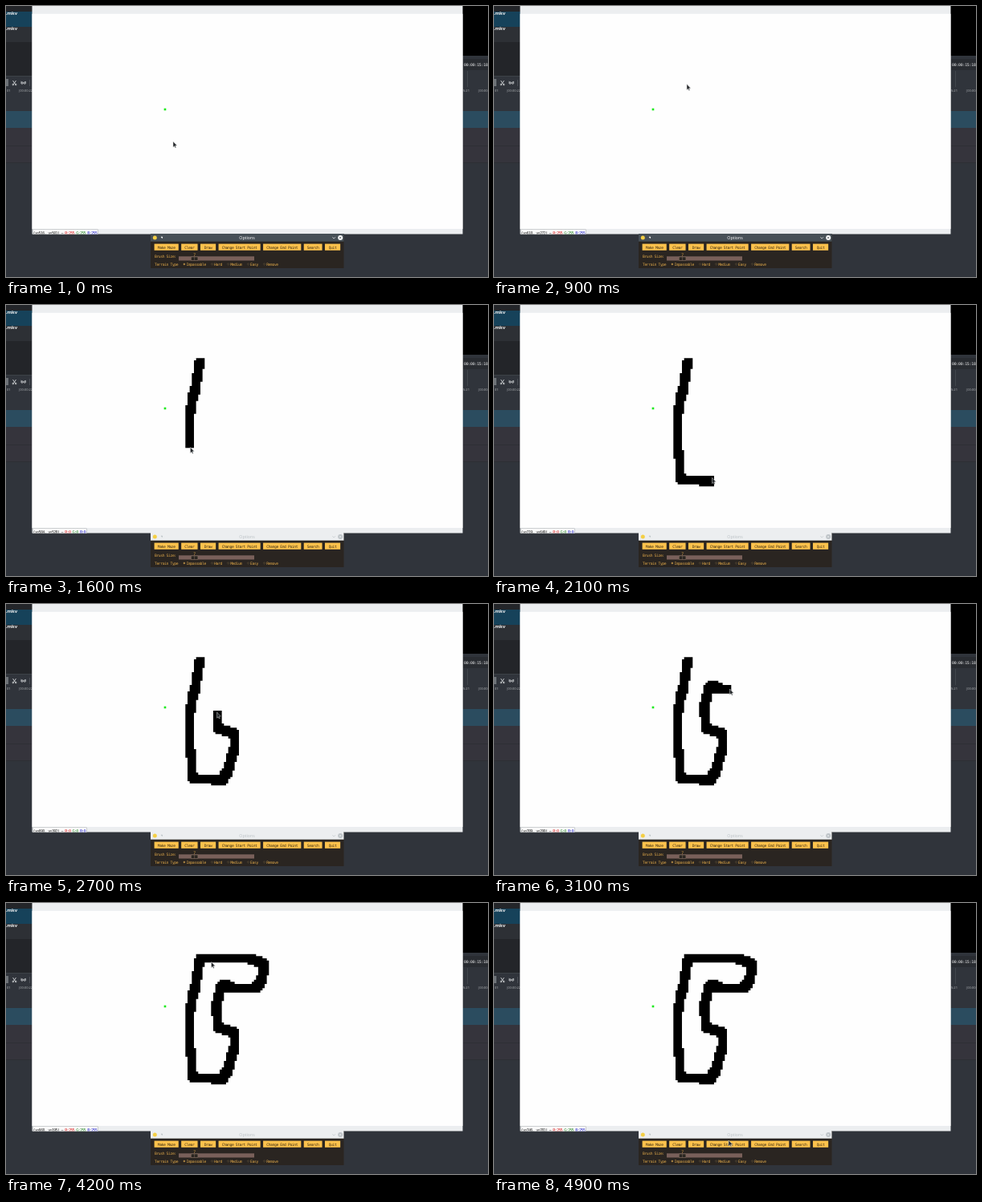
An HTML page that plays this animation: 600x338 px, repeating every 5000 ms.

```html
<!DOCTYPE html>
<html lang="en">
<head>
<meta charset="utf-8">
<title>Maze drawing</title>
<style>
html, body { margin: 0; width: 100%; height: 100%; overflow: hidden; background: #30343b; }
svg { display: block; width: 100vw; height: 100vh; }
text { white-space: pre; }
.mono { font: 4.7px "DejaVu Sans Mono", monospace; letter-spacing: -.39px; }
.ui { font-family: "Noto Sans", sans-serif; fill: #eff0f1; }
.amber { fill: #e0a94a; }
.status { font-size: 5.2px; letter-spacing: -.79px; fill: #333; }
.crisp { shape-rendering: crispEdges; }
</style>
</head>
<body>
<svg viewBox="0 0 600 338" preserveAspectRatio="none">
  <rect width="600" height="338" fill="#30343b"/>

  <!-- editor behind, left and right -->
  <g class="crisp">
    <rect width="33" height="88" fill="#232529"/>
    <rect y="7" width="33" height="19" fill="#16425a"/>
    <rect y="26" width="33" height="19" fill="#2d3035"/>
    <rect y="87" width="33" height="1" fill="#3c4147"/>
    <rect y="91" width="3" height="9" fill="#6d7277"/>
    <rect y="131" width="600" height="21" fill="#2b4c5f"/>
    <rect y="152" width="600" height="43" fill="#35343c"/>
    <rect y="174" width="600" height="1" fill="#2e2f35"/>
    <rect y="195" width="600" height="1" fill="#2c2e34"/>
    <rect x="568" width="32" height="62" fill="#000"/>
    <rect x="568" y="66" width="32" height="14" fill="#292c31"/>
    <rect x="574" y="81" width="1" height="20" fill="#42474d"/>
  </g>
  <g class="ui" font-size="6" font-weight="600">
    <text x="-.5" y="11.2">.mkv</text>
    <text x="-.5" y="30.2">.mkv</text>
  </g>
  <text class="mono" x="570" y="75" fill="#eff0f1" style="font-size:4.8px;letter-spacing:-.2px">00:00:15:18</text>
  <g class="ui" font-size="4" opacity=".65">
    <text x="1" y="106.6">01</text>
    <text x="15" y="106.6">|00:00:22:02</text>
    <text x="569" y="106.6">5:21</text>
    <text x="587" y="106.6">|00:00:29</text>
  </g>
  <g fill="none" stroke="#e4e6e7" stroke-width=".8">
    <path d="M8.5 93l3 4.5M12.5 93l-3 4.5"/>
    <circle cx="8.8" cy="98" r=".8"/><circle cx="12.2" cy="98" r=".8"/>
    <circle cx="20" cy="96" r="1.2"/><circle cx="23.3" cy="96" r="1.2"/>
    <path d="M18.5 94.2l1 .8M24.8 94.2l-1 .8"/>
  </g>
  <rect x="29" y="92" width=".7" height="8" fill="#555b60"/>

  <!-- drawing window -->
  <rect x="32.5" width="536" height="284.5" fill="#eceef0"/>
  <rect x="32.5" y="9.8" width="536" height="268.2" fill="#fefefe"/>
  <rect id="frame" x="33.3" y="278.8" height="6" fill="#fafafa" stroke="#a4a8ab" stroke-width=".5"/>
  <svg x="33" y="278" width="130" height="6.5" viewBox="33 278 130 6.5">
    <text id="status" class="mono status" x="33.6" y="284.8"></text>
  </svg>
  <path id="spot" fill="#1fea1f"/>
  <path id="ink"/>

  <!-- options window -->
  <rect x="180" y="284" width="240.5" height="43" fill="#2a2521"/>
  <rect id="bar" x="180" y="284" width="240.5" height="9.7"/>
  <circle cx="185.3" cy="289" r="2.5" fill="#f4cf45"/>
  <g id="caption">
    <text x="300" y="291" font-size="5.2" text-anchor="middle" font-family="Noto Sans, sans-serif">Options</text>
    <path d="M192 290.7l1.6-1.6M192.6 288l2 2 .6-1.6-1-1z"/>
    <path d="M406.4 288.3l1.8 1.8 1.8-1.8" fill="none" stroke="currentColor" stroke-width=".7"/>
    <circle cx="416.2" cy="289" r="3"/>
    <path id="cross" d="M415 287.8l2.4 2.4M417.4 287.8l-2.4 2.4" stroke-width=".7"/>
  </g>
  <g id="buttons"></g>
  <g class="mono amber">
    <text x="185" y="313.6">Brush Size:</text>
    <text x="185" y="323.7">Terrain Type</text>
  </g>
  <rect x="215" y="312.3" width="94" height="5.2" fill="#79605a"/>
  <g fill="#2a2521" stroke="#98826f" stroke-width=".4">
    <rect x="230.3" y="313" width="8.6" height="4.3"/>
    <path d="M234.6 313v4.3"/>
  </g>
  <text class="mono amber" x="233.3" y="311.8">7</text>
  <g id="radios"></g>

  <path id="cursor" d="M0 0V7.2L1.6 5.8L2.7 8L3.7 7.5L2.7 5.3L4.8 5.1z" fill="#24272a" stroke="#d8dadb" stroke-width=".5"/>
</svg>
<script>
const $ = id => document.getElementById(id);
const LOOP = 5000, STEP = 100, LAG = 15;
const DOWN = 1300, UP = 3960, LEAVE = 4600;
const CELL = 8 / 3, X0 = 1.97, Y0 = 2.3, BRUSH = 4;

// pointer legs: end time and the curve followed at even speed
const legs = [
  [900, "M208 169Q228 140 240 97.5"],
  [DOWN, "M240 97.5L241.3 71.6"],
  [1600, "M241.3 71.6L238 90L235.3 105C232 114 229.5 128 228.8 150L229.4 177.5"],
  [2700, "M229.4 177.5L231.3 210Q232 218 237 218L255 218.6L266 220.9Q275 214 278 201T284.5 182" +
    "L284.6 164Q284 159.5 275 158.3Q264 156.5 263.4 150L262.6 135"],
  [3500, "M262.6 135Q260.5 137 261.6 130L266.5 110Q268 102 272.5 101Q277 105.8 285 106" +
    "L306 106Q316 105 319 92L322 80Q321 74.5 310 71.5"],
  [UP, "M310 71.5Q305 69 298 69L242 69"],
  [4200, "M242 69L255.5 73.5"],
  [LEAVE, "M255.5 73.5L280 256.6"],
  [4900, "M280 256.6L292 296"]
].map(([end, d], i, all) => {
  const curve = document.createElementNS("http://www.w3.org/2000/svg", "path");
  curve.setAttribute("d", d);
  return { start: i ? all[i - 1][0] : 0, end, curve, length: curve.getTotalLength() };
});

function at(t) {
  const leg = legs.find(l => t <= l.end) ?? legs[legs.length - 1];
  const k = Math.min(1, (t - leg.start) / (leg.end - leg.start));
  return leg.curve.getPointAtLength(k * leg.length);
}

// square of n cells on the maze grid, centred near a point
function block({ x, y }, n) {
  const snap = (v, o) => o + CELL * (Math.round((v - o) / CELL - n / 2));
  const s = CELL * n;
  return `M${snap(x, X0).toFixed(2)} ${snap(y, Y0).toFixed(2)}h${s}v${s}h${-s}z`;
}

const marks = new Map();
for (let t = DOWN; t <= UP; t++) {
  const mark = block(at(t), BRUSH);
  if (!marks.has(mark)) marks.set(mark, t);
}
const ink = t => [...marks].filter(m => m[1] <= t - LAG).map(m => m[0]).join("");

function showStatus(t) {
  const { x, y } = at(Math.min(t, LEAVE));
  const v = t >= DOWN && t < UP ? 0 : 255;
  const part = (c, n) => `<tspan fill="${c}">${n}:${v}</tspan>`;
  $("status").innerHTML = `(x=${Math.round(3.2 * x - 150)}, y=${Math.round(3.2 * y - 40)}) ~ ` +
    [part("#d22", "R"), part("#2a8a2a", "G"), part("#22c", "B")].join(" ");
  $("frame").setAttribute("width", $("status").textContent.length * 2.34 + 1.5);
}

// lays labels out in a row, each as wide as its text asks
function row(id, x, gap, labels, width, view) {
  $(id).innerHTML = labels.map((label, i) => {
    const w = width(label.length), html = view(label, x, w, i);
    x += w + gap;
    return html;
  }).join("");
}

row("buttons", 184.6, 3.4,
  ["Make Maze", "Clear", "Draw", "Change Start Point", "Change End Point", "Search", "Quit"],
  n => Math.max(19.2, n * 2.44 + 8.2),
  (label, x, w) => `<rect x="${x}" y="296.6" width="${w}" height="8.2" fill="#fdc24c"/>
    <text class="mono" x="${x + w / 2}" y="302.5" text-anchor="middle" fill="#3a2d14">${label}</text>`);

row("radios", 220.6, 10.4, ["Impassable", "Hard", "Medium", "Easy", "Remove"],
  n => n * 2.42,
  (label, x, w, i) => `<path d="M${x} 322l1.3-1.3 1.3 1.3-1.3 1.3z" fill="${i ? "none" : "#d9a54a"}" stroke="#7d6744" stroke-width=".4"/>
    <text class="mono amber" x="${x + 3.9}" y="323.7">${label}</text>`);

function draw(t) {
  const idle = t >= DOWN, { x, y } = at(t);
  const tone = idle ? "#bdc3c7" : "#fcfcfc", back = idle ? "#eceef0" : "#475057";
  $("bar").setAttribute("fill", back);
  $("caption").setAttribute("fill", tone);
  $("caption").style.color = tone;
  $("cross").setAttribute("stroke", back);
  $("ink").setAttribute("d", ink(t));
  $("cursor").setAttribute("transform", `translate(${x} ${y})`);
  showStatus(t);
}

let start, last = -1;
function tick(now) {
  start ??= now;
  const t = Math.floor(((now - start) % LOOP) / STEP) * STEP;
  if (t !== last) draw(last = t);
  requestAnimationFrame(tick);
}

$("spot").setAttribute("d", block({ x: 198, y: 129 }, 1));
draw(0);
requestAnimationFrame(tick);
</script>
</body>
</html>
```
